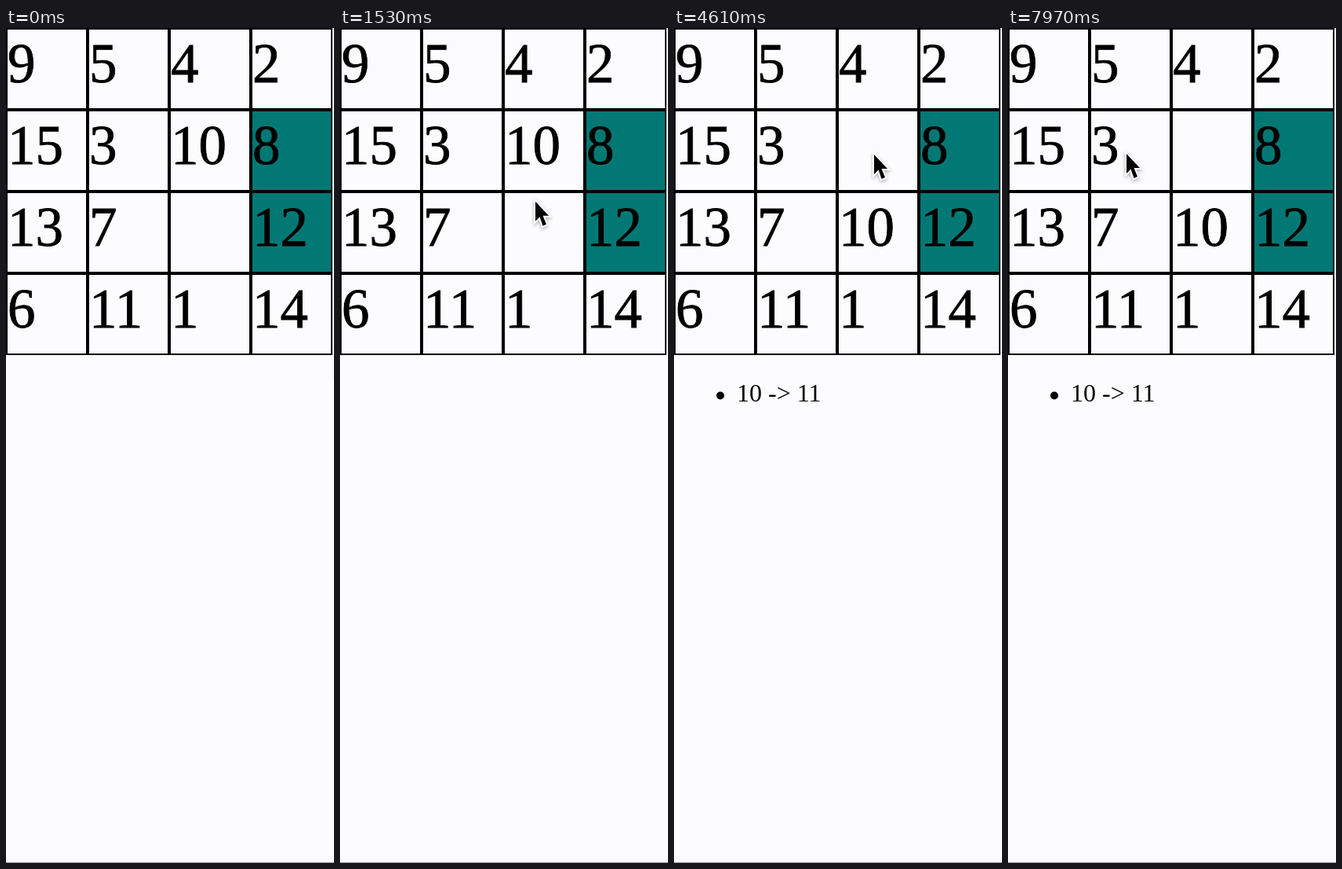
These frames come from a looping animation (418x1062 px, 7.99 s). An HTML page with a canvas:

```html
<!DOCTYPE html>
<html lang="en">
<head>
<meta charset="utf-8">
<title>Sliding puzzle</title>
<style>
  html, body { margin: 0; width: 100%; height: 100%; overflow: hidden; background: #fcfcfe; }
  canvas { display: block; }
</style>
</head>
<body>
<canvas id="stage" width="418" height="1062"></canvas>
<script>
const ctx = document.getElementById('stage').getContext('2d');
const LOOP = 7990, MOVE_AT = 3700, CELL = 104;
const FONT = '"Liberation Serif", "Times New Roman", serif';
const startTiles = '9 5 4 2 15 3 10 8 13 7 _ 12 6 11 1 14'.split(' ');
const movedTiles = swap(startTiles, '10', '_');

// Pointer strokes: each one starts where the previous ended and slows down.
const entry = { x: 422, y: 416 };
const strokes = [
  { from: 20, to: 730, x: 315, y: 329 },
  { from: 730, to: 1530, x: 249, y: 221 },
  { from: 1530, to: 2050, x: 255, y: 161 },
  { from: 5030, to: 6440, x: 151, y: 160 }
];
const arrow = new Path2D('M0 0V25L5.5 19.5L9.5 31L14 29L9.5 18H17Z');

function swap(tiles, a, b) {
  return tiles.map(n => n === a ? b : n === b ? a : n);
}

function easeOut(k) {
  return 1 - (1 - k) ** 2;
}

function pointerAt(t) {
  let { x, y } = entry;
  for (const s of strokes) {
    const k = easeOut(Math.min(1, Math.max(0, (t - s.from) / (s.to - s.from))));
    x += (s.x - x) * k;
    y += (s.y - y) * k;
  }
  return [x, y];
}

function drawTile(n, i) {
  const x = i % 4 * CELL, y = Math.floor(i / 4) * CELL;
  // A tile in its solved place is highlighted.
  if (+n === i + 1) {
    ctx.fillStyle = '#027874';
    ctx.fillRect(x, y, CELL, CELL);
  }
  ctx.fillStyle = ctx.strokeStyle = '#000';
  ctx.lineWidth = 2;
  ctx.strokeRect(x + 1, y + 1, CELL - 2, CELL - 2);
  if (n === '_') return;
  ctx.font = '71px ' + FONT;
  ctx.lineWidth = 0.8;
  ctx.fillText(n, x + 2, y + 69);
  ctx.strokeText(n, x + 2, y + 69);
}

function drawLog() {
  ctx.font = '32px ' + FONT;
  ctx.beginPath();
  ctx.arc(59, 467.5, 5, 0, 2 * Math.PI);
  ctx.fill();
  ctx.fillText('10 -> 11', 80, 475);
}

function drawPointer(x, y) {
  ctx.save();
  ctx.translate(x, y);
  ctx.shadowColor = 'rgba(0,0,0,.3)';
  ctx.shadowBlur = 4;
  ctx.shadowOffsetY = 2;
  ctx.strokeStyle = '#fff';
  ctx.lineWidth = 4;
  ctx.stroke(arrow);
  ctx.shadowColor = 'transparent';
  ctx.fillStyle = '#000';
  ctx.fill(arrow);
  ctx.restore();
}

function draw() {
  const t = performance.now() % LOOP;
  const moved = t >= MOVE_AT;
  ctx.fillStyle = '#fcfcfe';
  ctx.fillRect(0, 0, 418, 1062);
  ctx.fillStyle = '#999';
  ctx.fillRect(0, 1061, 418, 1);
  (moved ? movedTiles : startTiles).forEach(drawTile);
  if (moved) drawLog();
  drawPointer(...pointerAt(t));
  requestAnimationFrame(draw);
}
draw();
</script>
</body>
</html>
```
